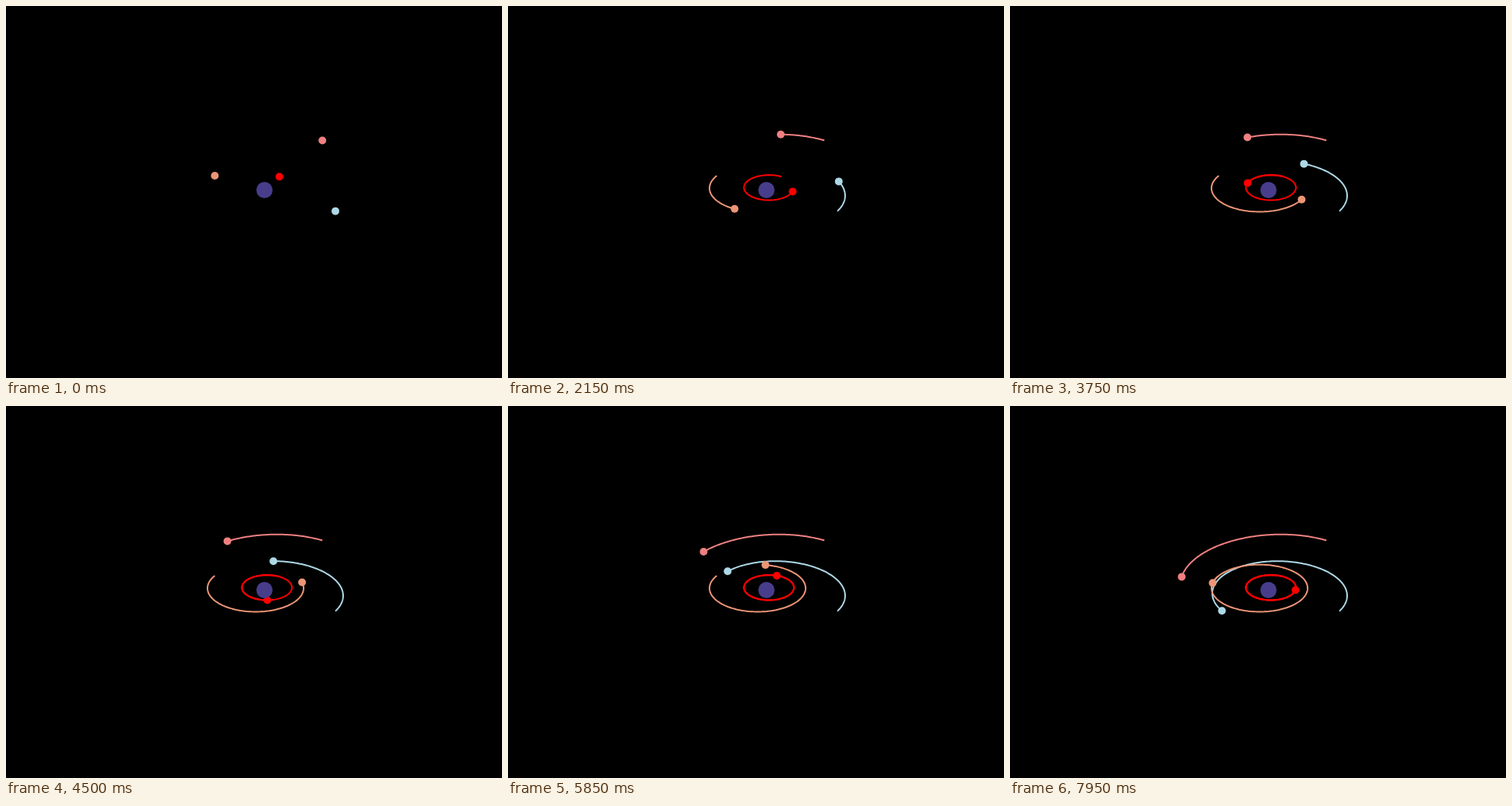
Recreate the animation shown at these times as an HTML page with a canvas. Size 640x480 px, loop 8 s.

```html
<!DOCTYPE html>
<html lang="en">
<head>
<meta charset="utf-8">
<title>Orbits</title>
<style>
  html, body { margin: 0; width: 100%; height: 100%; overflow: hidden; background: #000; }
  canvas { display: block; }
</style>
</head>
<body>
<canvas id="stage" width="640" height="480"></canvas>
<script>
const ctx = document.getElementById('stage').getContext('2d');
const LOOP = 8000, STEP = 50, RAD = Math.PI / 180;

// a, b: half axes; peri, shear, mean: degrees; rate: degrees per second
const planets = [
  { color: '#add8e6', x: 348, y: 243.3, a: 87, b: 43.1, peri: 152.3, shear: -2, mean: -180, rate: 28.8, e: 0.2 },
  { color: '#f08080', x: 342.2, y: 226.4, a: 122.2, b: 60.7, peri: 237.3, shear: 3.5, mean: -180, rate: 15.6, e: 0.2 },
  { color: '#ec9576', x: 322, y: 235.1, a: 62, b: 30.4, peri: -37, shear: 0, mean: -174, rate: 48.15, e: 0.195 },
  { color: '#ff0000', x: 336.7, y: 234.3, a: 32.3, b: 16.2, peri: 240.2, shear: 0, mean: -180, rate: 125.45, e: 0.21 }
];

// Solves Kepler's equation for the eccentric anomaly.
function eccentric(mean, e) {
  let angle = mean;
  for (let i = 0; i < 12; i++) angle = mean + e * Math.sin(angle);
  return angle;
}

function position(p, step) {
  const mean = (p.mean + p.rate * step * STEP / 1000) * RAD;
  const angle = eccentric(mean, p.e) + p.peri * RAD;
  return [p.x + p.a * Math.cos(angle), p.y - p.b * Math.sin(angle + p.shear * RAD)];
}

function dot(x, y, radius, color) {
  ctx.fillStyle = color;
  ctx.beginPath();
  ctx.arc(x, y, radius, 0, 2 * Math.PI);
  ctx.fill();
}

// Each lap is stroked on its own, so repeated laps thicken the line.
function trail(p, last) {
  const lap = Math.ceil(360 / p.rate * 1000 / STEP);
  ctx.strokeStyle = p.color;
  ctx.lineWidth = 2;
  ctx.lineJoin = 'round';
  for (let first = 0; first < last; first += lap) {
    ctx.beginPath();
    for (let i = first; i <= Math.min(first + lap, last); i++) ctx.lineTo(...position(p, i));
    ctx.stroke();
  }
}

function draw(now) {
  const step = Math.floor(now % LOOP / STEP);
  ctx.fillStyle = '#000';
  ctx.fillRect(0, 0, 640, 480);
  for (const p of planets) {
    const [x, y] = position(p, step);
    dot(x, y, 5, p.color);
    trail(p, step);
  }
  dot(333.5, 237.5, 10.5, '#483d8b');
}

let start;
function frame(now) {
  start ??= now;
  draw(now - start);
  requestAnimationFrame(frame);
}
draw(0);
requestAnimationFrame(frame);
</script>
</body>
</html>
```
